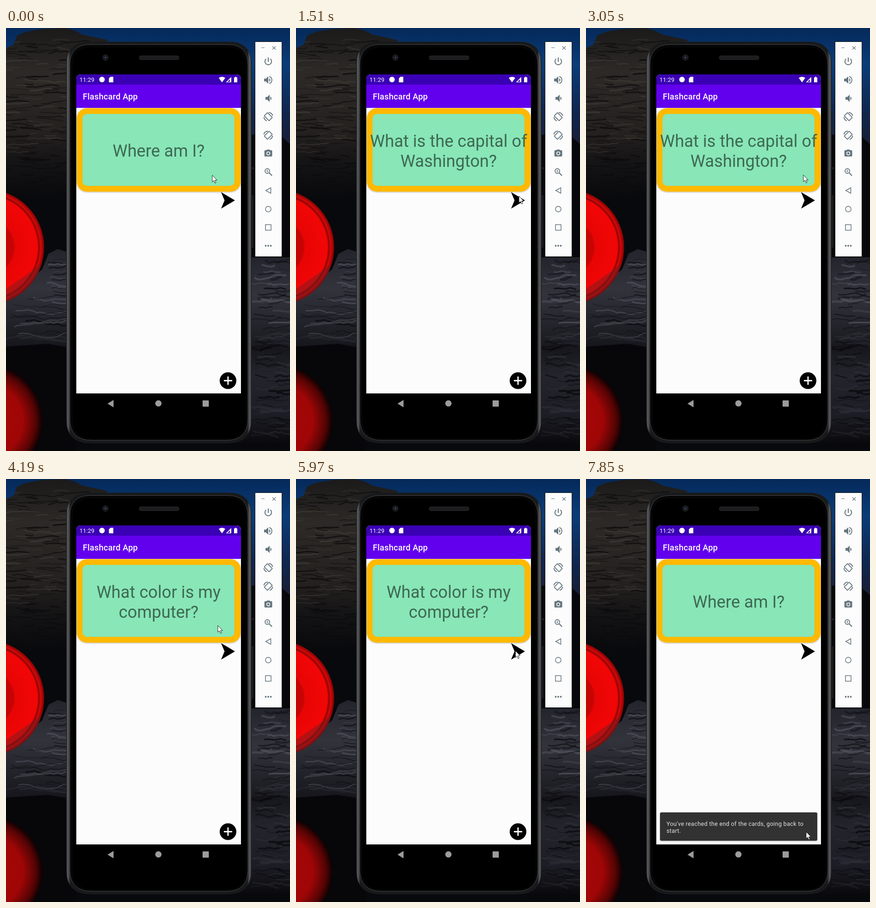
Write an HTML page that moves like this. It is 614 px wide and 911 px high and loops after 8 s.

```html
<!DOCTYPE html>
<html lang="en">
<head>
<meta charset="utf-8">
<title>Flashcard App</title>
<style>
html, body { margin: 0; width: 100%; height: 100%; overflow: hidden; background: #000; }
svg { display: block; width: 614px; height: 911px; font-family: Roboto, sans-serif; }
.icons { fill: #65767f; }
.line { fill: none; stroke: #65767f; stroke-width: 1.8; }
</style>
</head>
<body>
<svg viewBox="0 0 614 911">
  <defs>
    <linearGradient id="sky" x2="0" y2="1">
      <stop offset="0" stop-color="#05295a"/><stop offset=".3" stop-color="#0a3c78"/>
      <stop offset=".7" stop-color="#10264e"/><stop offset="1" stop-color="#1b1d30"/>
    </linearGradient>
    <linearGradient id="cliff" x2="0" y2="1">
      <stop offset="0" stop-color="#1b1a1a"/><stop offset=".25" stop-color="#2c2926"/>
      <stop offset=".6" stop-color="#24211f"/><stop offset=".8" stop-color="#131214"/>
      <stop offset="1" stop-color="#08090c"/>
    </linearGradient>
    <linearGradient id="rock" x2="0" y2="1">
      <stop offset="0" stop-color="#23242c"/><stop offset=".4" stop-color="#33333c"/>
      <stop offset="1" stop-color="#15151b"/>
    </linearGradient>
    <linearGradient id="shore" x2="0" y2="1">
      <stop offset="0" stop-color="#15151b"/><stop offset=".3" stop-color="#24242c"/>
      <stop offset=".7" stop-color="#1c1c24"/><stop offset="1" stop-color="#08080b"/>
    </linearGradient>
    <radialGradient id="ball">
      <stop offset="0" stop-color="#b90404"/><stop offset=".47" stop-color="#c80404"/>
      <stop offset=".5" stop-color="#e80505"/><stop offset=".88" stop-color="#f20606"/>
      <stop offset=".91" stop-color="#8c0505"/><stop offset=".94" stop-color="#d60808"/>
      <stop offset="1" stop-color="#7a0505"/>
    </radialGradient>
    <radialGradient id="mirror">
      <stop offset="0" stop-color="#a80606"/><stop offset=".65" stop-color="#a00606"/>
      <stop offset=".88" stop-color="#560404"/><stop offset="1" stop-color="#120102"/>
    </radialGradient>
    <linearGradient id="rim">
      <stop offset="0" stop-color="#2b2c2e"/><stop offset=".008" stop-color="#5d5f62"/>
      <stop offset=".022" stop-color="#18191a"/><stop offset=".978" stop-color="#18191a"/>
      <stop offset=".992" stop-color="#5d5f62"/><stop offset="1" stop-color="#2b2c2e"/>
    </linearGradient>
    <clipPath id="cliffClip"><path id="cliffShape" d="M0 43L16 36 24 16 44 8 80 2 128 0 150 6 165 14 221 26 201 42 160 60V372H0Z"/></clipPath>
    <filter id="shadow" x="-10%" y="-20%" width="120%" height="140%">
      <feDropShadow dx="0" dy="1" stdDeviation="1.6" flood-opacity=".3"/>
    </filter>
  </defs>

  <!-- Wallpaper -->
  <rect width="614" height="911" fill="#08090c"/>
  <rect width="614" height="260" fill="url(#sky)"/>
  <use href="#cliffShape" fill="url(#cliff)"/>
  <g id="strata" clip-path="url(#cliffClip)" fill="none"/>
  <path d="M520 232L560 226 598 236 614 250V500H520Z" fill="#07080b"/>
  <path d="M0 575L40 552 78 520 92 486 112 476 150 488V690L90 680 0 686Z" fill="url(#rock)"/>
  <path d="M500 494H614V700H500Z" fill="url(#rock)"/>
  <path d="M500 690L560 684 614 694V900H500Z" fill="url(#shore)"/>
  <g id="ledges" fill="none"/>
  <path d="M0 688L90 682 150 694V911H0Z" fill="#070609"/>
  <circle cx="-42" cy="472" r="124.5" fill="url(#ball)"/>
  <circle cx="-42" cy="846" r="120" fill="url(#mirror)"/>
  <path d="M0 562L75 510 70 530 48 560 20 580 0 590Z" fill="#5a2226" opacity=".4"/>

  <!-- Phone -->
  <path d="M529 300h4v4h2v-4M529 361h5v111h-5" fill="#17181a" stroke="#333" stroke-width=".7"/>
  <path d="M130.500 78Q130.500 30 180 30H482Q530.500 30 530.500 78V844Q530.500 894 478 894H184Q130.500 894 130.500 844Z" fill="url(#rim)" stroke="#1a1b1c"/>
  <path d="M138 80Q138 35.500 182 35.500H480Q523 35.500 523 80V842Q523 888 476 888H186Q138 888 138 842Z" fill="#060607" stroke="#46484b"/>
  <path d="M144 82Q144 42 184 42H478Q518 42 518 82V842Q518 884 474 884H188Q144 884 144 842Z" fill="#000"/>
  <circle cx="215" cy="63.500" r="6" fill="#17191d" stroke="#2a2c31"/>
  <circle cx="215" cy="63.500" r="2" fill="#39455e"/>
  <rect x="288" y="60" width="86" height="8" rx="4" fill="#1c1c1e" stroke="#303032"/>

  <!-- Screen -->
  <path d="M152 787V110q0-10 10-10H498q10 0 10 10V787Z" fill="#fcfcfc"/>
  <path d="M152 122V110q0-10 10-10H498q10 0 10 10V122Z" fill="#3a00b4"/>
  <path d="M152 122H508V172H152Z" fill="#6200ee"/>
  <g fill="#fff">
    <text x="159" y="116" font-size="12.7" letter-spacing=".15">11:29</text>
    <circle cx="207.500" cy="111" r="6"/>
    <path d="M226 105h6v12h-9.500v-8.500z"/>
    <path d="M460 107.500q7-5 14 0L467 117Z"/>
    <path d="M487 105.500V117H475.500ZM484 111l-5.200 5H484Z" fill-rule="evenodd"/>
    <path d="M493 106.500h2.200v-1.500h2.600v1.500H500V117h-7z"/>
    <text x="166" y="154" font-size="18.13" font-weight="500" letter-spacing=".23">Flashcard App</text>
  </g>
  <rect x="153" y="172.500" width="354.500" height="180" rx="22" fill="#ffb900" filter="url(#shadow)"/>
  <rect x="165.500" y="185" width="328.500" height="155" rx="10" fill="#88e6b7"/>
  <g id="card" font-size="36.26" text-anchor="middle" fill="#3e6953">
    <text x="330"/><text x="330"/>
  </g>
  <path d="M465 353.500L495 371.300 465 389 472.500 371.300Z"/>
  <circle cx="480" cy="759.500" r="18"/>
  <path d="M471 759.500h18M480 750.500v18" stroke="#fff" stroke-width="2.800"/>
  <g id="toast">
    <rect x="160" y="718" width="340" height="61" rx="3" fill="#323232" filter="url(#shadow)"/>
    <g font-size="12.69" letter-spacing=".28" fill="#e4e4e4">
      <text x="174" y="746.500">You've reached the end of the cards, going back to</text>
      <text x="174" y="761.500">start.</text>
    </g>
  </g>
  <g fill="#9c9c9c">
    <path d="M219.500 809L232.500 801V817Z"/>
    <circle cx="329.500" cy="808.500" r="6.800"/>
    <rect x="425" y="802" width="13.500" height="13.500" rx="1"/>
  </g>

  <!-- Emulator controls -->
  <rect x="538.500" y="29.500" width="58" height="463" fill="#fcfcfc" stroke="#111"/>
  <path d="M552 42.500h7M576 39.500l7 7M583 39.500l-7 7" class="line" style="stroke-width:1.200"/>
  <g class="icons">
    <g transform="translate(567 72)"><path class="line" style="stroke-width:2" d="M0-8.500V1M-4.700-5.500A7.200 7.200 0 1 0 4.700-5.500"/></g>
    <g transform="translate(555 100)"><path d="M3 9v6h4l5 5V4L7 9zM14 8v8q2.500-1.300 2.500-4T14 8z"/><path class="line" d="M14 4.300a8 8 0 0 1 0 15.400"/></g>
    <path transform="translate(556 139.500)" d="M5 9v6h4l5 5V4L9 9zM15.500 8v8q2.500-1.300 2.500-4T15.500 8z"/>
    <g id="turn" class="line" transform="translate(567 191)">
      <rect x="-5" y="-7.500" width="10" height="15" rx="1" transform="rotate(-45)"/>
      <path d="M-9.500 1Q-8.500 7-3 9M1-9Q8-8.500 9.500-2"/>
    </g>
    <use href="#turn" transform="matrix(-1 0 0 1 1134 40)"/>
    <path transform="translate(557 260) scale(.84)" fill-rule="evenodd" d="M9 2L7.200 4H4a2 2 0 0 0-2 2v12a2 2 0 0 0 2 2h16a2 2 0 0 0 2-2V6a2 2 0 0 0-2-2h-3.200L15 2zm3 5a5 5 0 1 1 0 10 5 5 0 0 1 0-10zm0 2a3 3 0 1 0 0 6 3 3 0 0 0 0-6z"/>
    <g class="line" transform="translate(565 308)"><circle r="5"/><path d="M4 4L10 10" stroke-width="2.300"/><path d="M-2.500 0h5M0-2.500v5" stroke-width="1.200"/></g>
    <path class="line" style="stroke-width:1.500" d="M561.500 350L572.500 344V356Z"/>
    <circle class="line" style="stroke-width:1.500" cx="567" cy="390" r="6"/>
    <rect class="line" style="stroke-width:1.500" x="561" y="423.500" width="12" height="12"/>
    <circle cx="561.500" cy="469" r="1.900"/><circle cx="567" cy="469" r="1.900"/><circle cx="572.500" cy="469" r="1.900"/>
  </g>

  <path id="cursor" d="M0 0V14.500L3.300 11.500 5.700 17 8 16 5.700 10.700H10.300Z" fill="#fff" stroke="#111" stroke-width=".9"/>
</svg>
<script>
const $ = id => document.getElementById(id);

// Rock texture: wavering strokes from a seeded generator
let seed = 7;
const rnd = (a, b) => {
  seed = (seed * 16807) % 2147483647;
  return a + (b - a) * seed / 2147483647;
};
function streak(group, x, y, end, rough, color, width) {
  let d = `M${x} ${y}`;
  while (x < end) d += `L${x += rnd(5, 14)} ${y += rnd(-rough, rough)}`;
  const p = document.createElementNS('http://www.w3.org/2000/svg', 'path');
  p.setAttribute('d', d);
  p.setAttribute('stroke', color);
  p.setAttribute('stroke-width', width);
  p.setAttribute('opacity', rnd(.3, .8));
  $(group).append(p);
}
for (let y = 24; y < 365; y += rnd(1, 4)) {
  const x = rnd(-30, 130);
  const light = y < 270 && rnd(0, 1) < .35;
  streak('strata', x, y, x + rnd(15, 70), 2.5, light ? '#3f3a35' : '#0b0b0c', rnd(.8, 3.5));
}
for (let y = 500; y < 880; y += rnd(3, 8)) {
  const light = rnd(0, 1) < .4;
  const color = light ? (y < 660 ? '#50505a' : '#2f2f38') : '#0a0a0e';
  const x = rnd(525, 590);
  streak('ledges', x, y, x + rnd(20, 70), 4, color, rnd(1, 5));
  if (y < 675) streak('ledges', rnd(y < 580 ? 88 : 0, 105), y, 128, 4, color, rnd(1, 4));
}

// [time, text lines]
const cards = [
  [0, 'Where am I?'], [130, 'Home'], [690, 'Where am I?'],
  [1390, 'What is the capital of', 'Washington?'], [2180, 'Olympia'],
  [3050, 'What is the capital of', 'Washington?'],
  [3620, 'What color is my', 'computer?'], [4470, 'Black'],
  [5030, 'What color is my', 'computer?'], [6090, 'Where am I?']
];
// [time, x, y] of the pointer tip
const moves = [
  [0, 446, 317], [840, 453, 318], [990, 462, 332], [1115, 474, 350], [1240, 481.5, 361],
  [1510, 482, 362], [1790, 471, 319.5], [1930, 466, 311.5], [3050, 470, 316.5],
  [3200, 474, 331], [3350, 475, 347], [3500, 475, 363], [3620, 475, 367],
  [4040, 461, 319.5], [4190, 458, 315.5], [5460, 461, 323], [5580, 465, 337],
  [5730, 470, 353], [5850, 474, 369], [5970, 474.5, 370], [6760, 473, 530],
  [6880, 472, 648.5], [7030, 471, 680], [7160, 471, 703], [7310, 471, 726],
  [7430, 472, 743], [7580, 473.5, 752], [7700, 475, 757], [7850, 476, 760]
];
const at = (list, t) => list.findLast(k => k[0] <= t);
const [top1, top2] = $('card').children;

function draw(now) {
  const t = now % 8000;
  const [, first, second = ''] = at(cards, t);
  top1.textContent = first;
  top2.textContent = second;
  top1.setAttribute('y', second ? 256 : 277);
  top2.setAttribute('y', 298.5);

  const [, x, y] = at(moves, t);
  $('cursor').setAttribute('transform', `translate(${x} ${y})`);

  const p = Math.min(1, Math.max(0, (t - 6060) / 180));
  const s = 1 - .2 * (1 - p) ** 2;
  $('toast').setAttribute('opacity', p);
  $('toast').setAttribute('transform', `translate(330 748.5) scale(${s}) translate(-330 -748.5)`);
}
const start = performance.now();
function tick() {
  draw(performance.now() - start);
  requestAnimationFrame(tick);
}
tick();
</script>
</body>
</html>
```
